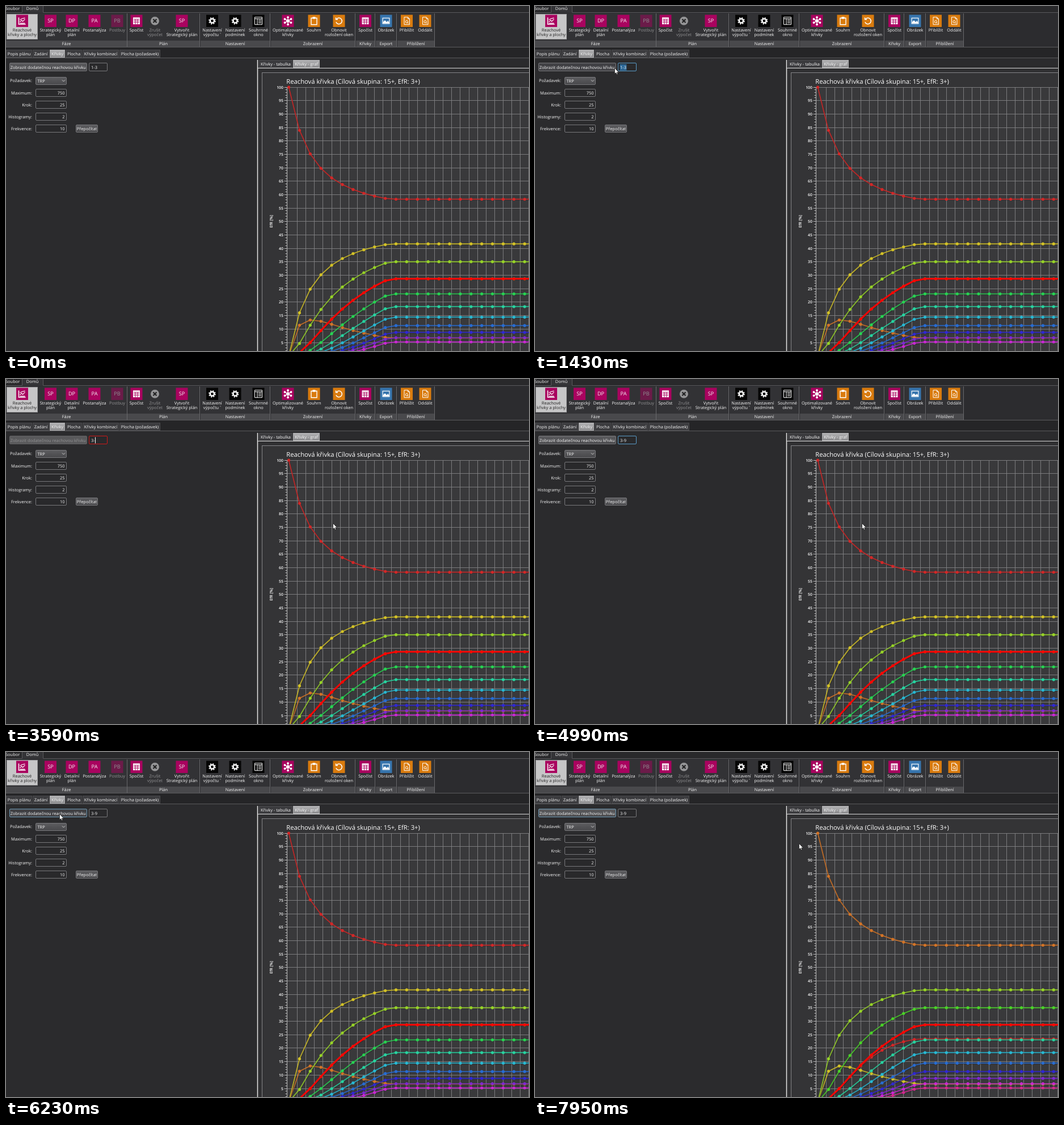
Write an HTML page that moves like this. It is 922 px wide and 608 px high and loops after 8000 ms.

```html
<!DOCTYPE html>
<html lang="cs">
<head>
<meta charset="utf-8">
<title>Reachové křivky</title>
<style>
html, body { margin: 0; width: 100%; height: 100%; overflow: hidden; background: #2b2b2d; }
svg { display: block; }
text { font-family: "Open Sans", "Noto Sans", sans-serif; font-size: 7.45px; fill: #f6f6f6; text-rendering: geometricPrecision; white-space: pre; }
.axis { font-size: 6.8px; font-weight: 600; fill: #fff; }
.title { font-size: 11.24px; fill: #fff; }
.icon { font-size: 9.2px; }
.dark { fill: #222; }
</style>
</head>
<body>
<svg id="stage" width="922" height="608" viewBox="0 0 922 608">
  <defs>
    <linearGradient id="btn" x1="0" y1="0" x2="0" y2="1">
      <stop offset="0" stop-color="#5d5d60"/><stop offset="1" stop-color="#48484b"/>
    </linearGradient>
    <linearGradient id="sel" x1="0" y1="0" x2="0" y2="1">
      <stop offset="0" stop-color="#b2b2b4"/><stop offset="1" stop-color="#8a8a8c"/>
    </linearGradient>
  </defs>
</svg>
<script>
const stage = document.getElementById('stage');
const MAGENTA = '#a9035f', ORANGE = '#d97b0e', BLUE = '#3775ad', BLACK = '#050505';

// Markup helpers
const rect = (x, y, w, h, fill, extra = '') =>
  `<rect x="${x}" y="${y}" width="${w}" height="${h}" fill="${fill}" ${extra}/>`;
const box = (x, y, w, h, fill, line, extra = '') =>
  rect(x + .5, y + .5, w - 1, h - 1, fill, `stroke="${line}" ${extra}`);
const path = (d, color = '#fff', width = 1, extra = '') =>
  `<path d="${d}" fill="none" stroke="${color}" stroke-width="${width}" ${extra}/>`;
const text = (s, x, y, anchor = 'start', extra = '') =>
  `<text x="${x}" y="${y}" text-anchor="${anchor}" ${extra}>${s}</text>`;
const mid = (s, x, y, extra) => text(s, x, y, 'middle', extra);
const add = (markup, id = '') =>
  stage.insertAdjacentHTML('beforeend', `<g${id && ` id="${id}"`}>${markup}</g>`);

const pen = document.createElement('canvas').getContext('2d');
pen.font = '100px "Open Sans", "Noto Sans", sans-serif';
const measure = s => pen.measureText(s).width * .0745;

// Icons, centred on 0,0
const spokes = [...Array(6).keys()].map(i =>
  `<g transform="rotate(${i * 60})">${path('M0 0V-6')}<circle cy="-6.3" r="1.9" fill="#fff"/></g>`).join('');
const icons = {
  chart: path('M-6 -6V6H6', '#fff', 1.5) + path('M-4 2L-1 -1L1 1L5 -3M-4 -2L0 -4L5 -5M-4 4.2H5', '#fff', 1.2),
  calc: rect(-6, -6, 12, 12, '#fff') + rect(-5, -3.4, 10, .9, MAGENTA) +
    path('M-5 -.2H5M-5 2.6H5M-2 -3V6M2 -3V6', MAGENTA, .9),
  gear: '<circle r="3.6" fill="none" stroke="#fff" stroke-width="2.4"/>' +
    '<circle r="5.5" fill="none" stroke="#fff" stroke-width="1.7" stroke-dasharray="2.2 2.12"/>',
  page: path('M-4.5 -6.5H2L5 -3.5V6.5H-4.5ZM2 -6.5V-3.5H5') +
    '<circle cy="1.5" r="2.1" fill="none" stroke="#fff"/>' + path('M1.5 3L3.2 4.8'),
  stop: '<circle r="7.5" fill="#fff"/>' + path('M-3 -3L3 3M3 -3L-3 3', '#111', 2.2),
  pane: path('M-6.5 -6.5H6.5V6.5H-6.5ZM-6.5 -3.8H6.5M-2 -4V6.5') + path('M0 -1.5H5M0 1H5M0 3.5H5'),
  net: '<circle r="3" fill="#fff"/>' + spokes,
  clip: path('M-5 -5H5V6.5H-5Z', '#fff', 1.4) + rect(-2.5, -7, 5, 3.5, '#fff'),
  undo: path('M-4.5 -3A5.4 5.4 0 1 1 -5.2 2', '#fff', 1.5) + path('M-5.5 -6V-2.4H-2', '#fff', 1.4),
  image: rect(-6.5, -5.5, 13, 11, '#fff') + rect(-5.3, -4.3, 10.6, 8.6, BLUE) +
    '<path d="M-5.3 4.3V2L-2 -1L1 2L3 0L5.3 2V4.3Z" fill="#fff"/>'
};

// Ribbon: each group shares its spare width evenly between its tools
const groups = [
  ['Fáze', 0, 213, [['chart', MAGENTA, 'Reachové', 'křivky a plochy', 'on'],
    ['SP', MAGENTA, 'Strategický', 'plán'], ['DP', MAGENTA, 'Detailní', 'plán'],
    ['PA', MAGENTA, 'Postanalýza'], ['PB', MAGENTA, 'Postbuy', '', 'off']]],
  ['Plán', 214, 341, [['calc', MAGENTA, 'Spočíst'], ['stop', 'none', 'Zrušit', 'výpočet', 'off'],
    ['SP', MAGENTA, 'Vytvořit', 'Strategický plán']]],
  ['Nastavení', 343, 465, [['gear', BLACK, 'Nastavení', 'výpočtu ˅'],
    ['gear', BLACK, 'Nastavení', 'podmínek'], ['pane', BLACK, 'Souhrnné', 'okno']]],
  ['Zobrazení', 467, 615, [['net', MAGENTA, 'Optimalizované', 'křivky'],
    ['clip', ORANGE, 'Souhrn'], ['undo', ORANGE, 'Obnovit', 'rozložení oken']]],
  ['Křivky', 617, 650, [['calc', MAGENTA, 'Spočíst']]],
  ['Export', 652, 688, [['image', BLUE, 'Obrázek']]],
  ['Přiblížení', 690, 755, [['page', ORANGE, 'Přiblížit'], ['page', ORANGE, 'Oddálit']]]
];
const tool = (x, [icon, color, top, bottom = '', state]) => {
  const ink = state === 'on' ? 'class="dark"' : '';
  const glyph = icons[icon] || mid(icon, 0, 3.2, 'class="icon"');
  return (state === 'on' ? box(1, 14, 55, 45, '#c6c6c7', '#98989a') : '') +
    `<g ${state === 'off' ? 'opacity=".48"' : ''}>` + rect(x - 10.5, 15.5, 21, 21.5, color) +
    `<g transform="translate(${x} 26.2)">${glyph}</g>` +
    mid(top, x, 45.3, ink) + mid(bottom, x, 53.3, ink) + '</g>';
};
const group = ([name, a, b, tools]) => {
  const widths = tools.map(([, , top, bottom = '']) => Math.max(measure(top), measure(bottom)));
  const gap = (b - a - widths.reduce((sum, w) => sum + w)) / tools.length;
  let x = a;
  return rect(a, 13, b - a, 59, '#323235') + rect(a, 61, b - a, 11, '#49494c') +
    path(`M${b + .5} 13V72`, '#69696c') + mid(name, (a + b) / 2, 69) +
    tools.map((item, i) => {
      const cell = widths[i] + gap;
      x += cell;
      return tool(Math.round(2 * x - cell) / 2, item);
    }).join('');
};
add(rect(0, 0, 922, 608, '#2b2b2d') + rect(0, 0, 922, 12, '#29292b') +
  path('M0 11.5H28.5V0M65.5 0V11.5H922', '#59595c') + rect(29, 0, 36, 13, '#343437') +
  text('Soubor', -1, 7) + mid('Domů', 46.5, 7) +
  rect(0, 12, 922, 61, '#2c2c2f') + groups.map(group).join('') +
  path('M0 72.5H922', '#5b5b5e') + rect(0, 73, 922, 18, '#252527'));

// Tabs
const tabs = (names, active, x, y, id) => names.map(name => {
  const left = Math.round(x), w = Math.round(measure(name) + 5.7), on = name === active;
  x += measure(name) + 6.6;
  return box(left, y, w, 14, on ? 'url(#sel)' : '#3b3b3e', on ? '#b0b0b2' : '#4b4b4e', on ? `id="${id}"` : '') +
    mid(name, left + w / 2, y + 10);
}).join('');
add(tabs(['Popis plánu', 'Zadání', 'Křivky', 'Plocha', 'Křivky kombinací', 'Plocha (požadavek)'],
  'Křivky', 0, 77, 'tab') + path('M0 91.5H922', '#59595c'));

// Form
const rows = [['Maximum:', 750], ['Krok:', 25], ['Histogramy:', 2], ['Frekvence:', 10]];
const round = 'rx="1.5"';
const row = ([label, value], i) => {
  const y = 146 + 21 * i;
  return text(label, 46, y + 10.2, 'end') + box(52, y, 55, 14, '#29292b', '#77777a', round) +
    text(value, 103.5, y + 10, 'end');
};
add(box(6, 100, 137, 15, 'url(#btn)', '#77777a', `${round} id="show"`) +
  text('Zobrazit dodatečnou reachovou křivku', 7.7, 110.7, 'start', 'id="showText"') +
  box(146, 100, 33, 15, '#29292b', '#77777a', `${round} id="field"`) +
  rect(149.5, 102.5, 12, 11, '#2c6897', 'id="mark"') +
  text('', 150, 110.5, 'start', 'id="value"') +
  rect(0, 102.5, 1, 11, '#fff', 'id="caret"') +
  text('Požadavek:', 46, 134.3, 'end') + box(52, 125, 55, 14, 'url(#btn)', '#77777a', round) +
  text('TRP', 55.5, 134.5) + path('M99 130.5L101.5 133L104 130.5', '#ddd', .9) +
  rows.map(row).join('') +
  box(123, 209, 39, 14, 'url(#btn)', '#77777a', round) + mid('Přepočítat', 142.5, 218.8));

// Chart frame
const X0 = 498.5, DX = 18.9, yOf = v => 143 + (100 - v) * 4.737;
const snap = v => Math.floor(v) + .5;
let grid = '', ticks = '', labels = '';
for (let x = X0 + DX * .8; x < 922; x += DX * .8) grid += `M${snap(x)} 143V608`;
for (let v = 100; v > 1; v--) {
  const y = snap(yOf(v));
  if (v % 5) ticks += `M492.5 ${y}H495`;
  else {
    grid += `M495 ${y}H922`;
    ticks += `M490.5 ${y}H495`;
    labels += text(v, 488.8, yOf(v) + 2.5, 'end', 'class="axis"');
  }
}
add(rect(443, 95, 479, 513, '#2b2b2d') + tabs(['Křivky - tabulka', 'Křivky - graf'], 'Křivky - graf', 446, 95, 'view') +
  path('M443.5 95V608', '#e8e8e8', 1.5) + path('M444 109.5H922', '#d8d8d8') +
  rect(445, 110, 477, 498, '#303032') + box(451, 117, 480, 500, '#343436', '#858588') +
  rect(495, 143, 427, 465, '#39393b') + path(grid, '#838385', .9) +
  path('M495.5 143V608' + ticks, '#c8c8c8', .9) + labels +
  text('Reachová křivka (Cílová skupina: 15+, EfR: 3+)', 494.3, 137, 'start', 'class="title"') +
  mid('EfR [%]', 0, 0, 'class="axis" transform="translate(470 379.5) rotate(-90)"'));

// Contacts follow a negative binomial law in the reachable share of the audience;
// the mean grows with every step until the campaign is sold out.
const REACHABLE = 47.35, SHAPE = 1.6, RATE = .4725, SOLD_OUT = 9.39;
const reach = (n, step) => {
  const mean = RATE * Math.min(step, SOLD_OUT), p = mean / (mean + SHAPE);
  let share = (1 - p) ** SHAPE, rest = 1;
  for (let i = 0; i < n; i++) {
    rest -= share;
    share *= (SHAPE + i) / (i + 1) * p;
  }
  return REACHABLE * rest;
};
const curve = (value, color, width = 1.9) => {
  let line = '', dots = '';
  for (let i = 0; i < 24; i++) {
    const x = X0 + i * DX, y = yOf(value(i)).toFixed(1);
    line += `${line ? 'L' : 'M'}${x} ${y}`;
    dots += `<circle cx="${x}" cy="${y}" r="2.6"/>`;
  }
  return path(line, '#202022', 2.4, 'opacity=".3" transform="translate(.8 1)"') +
    path(line, color, width, width < 2 ? 'opacity=".82"' : '') + `<g fill="${color}">${dots}</g>`;
};
const zero = i => 100 - reach(1, i);
const range = (a, b) => i => reach(a, i) - reach(b + 1, i);
const atLeast = n => i => reach(n, i);
const base = [zero, range(1, 1), ...[...Array(10).keys()].map(n => atLeast(n + 1))];
const chart = curves =>
  curves.map((c, i) => curve(c, `hsl(${i * 27} 68% 49%)`)).join('') + curve(atLeast(3), '#fa0505', 3);
add(chart(base), 'before');
add(chart([range(3, 9), ...base]), 'after');

add('<path d="M.5 .3V10.6L2.8 8.5L4.3 11.8L5.9 11.1L4.5 7.9H7.7Z" fill="#fff" stroke="#111" stroke-width=".7"/>', 'cursor');

// Pointer moves: start, end, x, y
const moves = [
  [0, 0, 1130, 827],
  [70, 470, 92, 82], [550, 800, 163, 106],
  [1040, 1430, 140, 109], [1510, 1880, 576, 254],
  [5070, 5230, 92, 82], [5460, 5620, 104, 39], [5700, 6080, 94, 109],
  [6630, 6950, 286, 254], [7100, 7180, 293, 256], [7640, 7950, 465, 161]
];
const pointer = t => {
  const i = moves.filter(m => m[0] <= t).length - 1;
  const [start, end, ...to] = moves[i];
  if (!i) return to;
  const from = moves[i - 1].slice(2);
  const last = Math.round((end - start) / 78);
  const step = Math.min(last, Math.floor((t - start) / (end - start) * last + 1e-6));
  const u = 1 - (1 - (step + 1) / (last + 1)) ** 2;
  return to.map((v, k) => from[k] + (v - from[k]) * u);
};

const keys = [[0, '1-3'], [2830, '3'], [3590, '3-'], [4370, '3-9']];
const BLINK = 560;

const el = id => document.getElementById(id);
const set = (id, attrs) => { for (const k in attrs) el(id).setAttribute(k, attrs[k]); };
const between = (t, a, b) => t >= a && t < b;
const show = (id, on) => set(id, { visibility: on ? 'visible' : 'hidden' });

function draw(t) {
  const [x, y] = pointer(t);
  const inside = (a, b, c, d) => between(x, a, c) && between(y, b, d);
  const [typed, value] = keys.filter(k => k[0] <= t).pop();
  const invalid = value === '3-', focused = between(t, 1040, 6230);

  set('cursor', { transform: `translate(${x} ${y})` });
  set('tab', { fill: inside(78, 77, 105, 91) ? '#a8a8ab' : 'url(#sel)' });
  set('show', {
    fill: invalid ? '#59595b' : inside(6, 100, 143, 115) ? '#414145' : 'url(#btn)',
    stroke: t >= 6230 ? '#6f9ab5' : invalid ? '#626264' : '#77777a'
  });
  el('showText').style.fill = invalid ? '#929294' : '#f6f6f6';
  set('field', { stroke: invalid ? '#d01818' : focused ? '#5a9cc8' : '#77777a' });
  show('mark', focused && !typed);
  el('value').textContent = value;
  set('caret', { x: Math.round(150 + measure(value)) });
  show('caret', typed && focused && (t - typed) % (2 * BLINK) < BLINK);
  show('before', t < 6630);
  show('after', t >= 6630);
}

const begin = performance.now();
function tick() {
  draw((performance.now() - begin) % 8000);
  requestAnimationFrame(tick);
}
tick();
</script>
</body>
</html>
```
